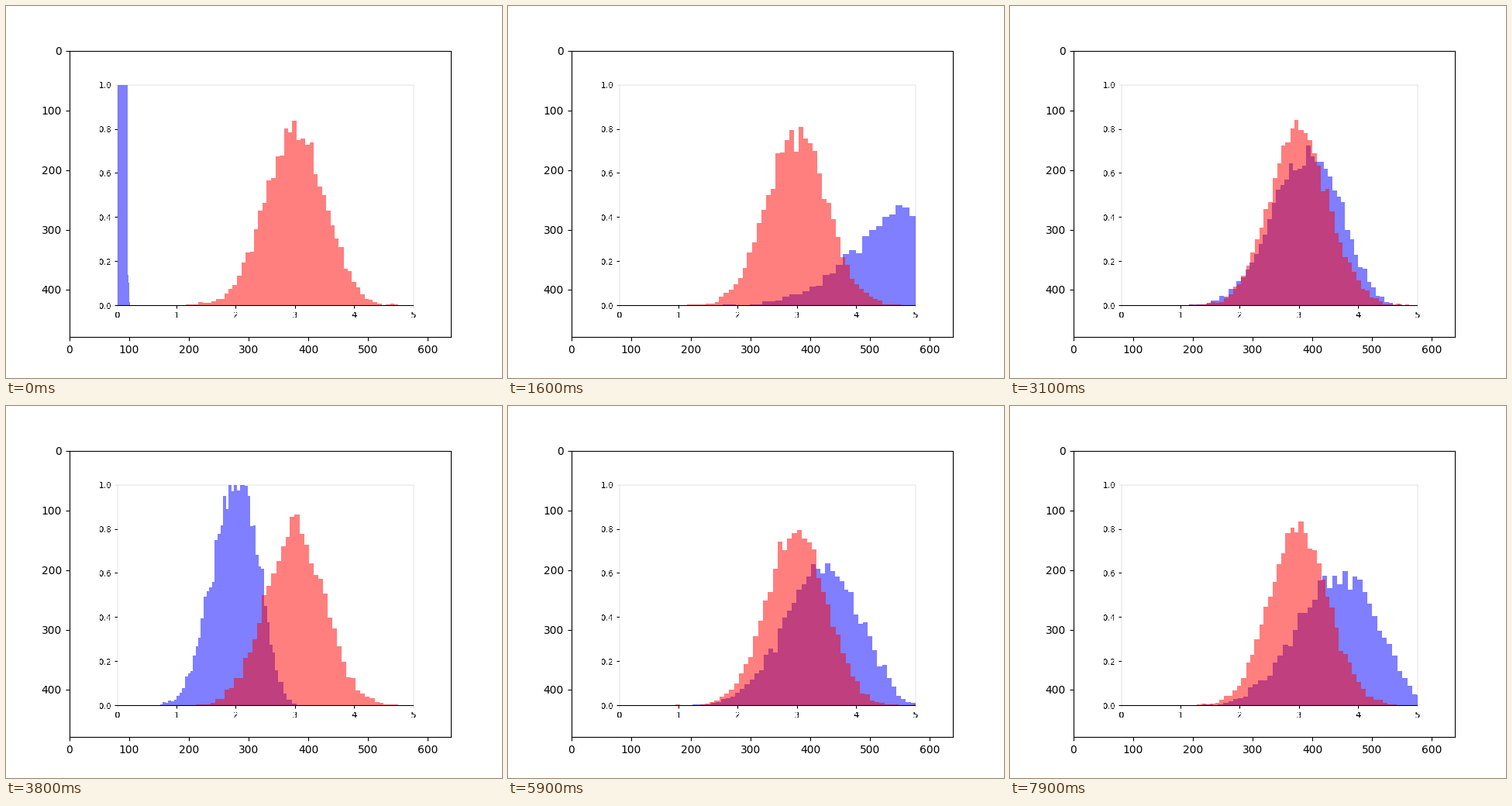
Animation of 640 by 480 pixels, one loop 8 s. Source, as a matplotlib script:

```python
import numpy as np
import matplotlib.pyplot as plt
from matplotlib.animation import FuncAnimation

FRAMES, INTERVAL = 80, 100
SAMPLES, BINS = 10000, 50
W, H = 640, 480
LEFT, RIGHT, TOP, BOTTOM = 80.0, 576.0, 57.6, 427.2
X_MAX = 5
BLUE, RED = np.array([0, 0, 1.0]), np.array([1.0, 0, 0])

# Key times (s) and the position of the blue peak at each
KEY_T = np.array([0, 0.9, 1.6, 3.1, 3.6, 4.6, 5.9, 6.9, 7.9])
KEY_X = np.array([0.09, 1.5, 5.0, 3.17, 2.15, 2.06, 3.48, 2.46, 3.7])

plt.rcParams["text.kerning_factor"] = 6


def peak_at(t):
    """Smooth curve through the key points (cubic Hermite)."""
    k = min(np.searchsorted(KEY_T, t, side="right"), len(KEY_T) - 1)
    x0, x1 = KEY_X[k - 1:k + 1]
    dt = KEY_T[k] - KEY_T[k - 1]

    def slope(j):
        a, b = max(j - 1, 0), min(j + 1, len(KEY_T) - 1)
        return (KEY_X[b] - KEY_X[a]) / (KEY_T[b] - KEY_T[a])

    u = (t - KEY_T[k - 1]) / dt
    ease = u * u * (3 - 2 * u)
    bend = u * (1 - u) * dt * ((1 - u) * slope(k - 1) - u * slope(k))
    return x0 + (x1 - x0) * ease + bend


def blue_samples(rng, peak):
    """Left-leaning bell whose width grows with its position."""
    a, b = 11, 7
    mode = (a - 1) / (a + b - 2)
    return peak + (1.5 * peak + 0.25) * (rng.beta(a, b, SAMPLES) - mode)


def paint_hist(img, data, color):
    """Blend a density histogram at half opacity, edges snapped to pixels."""
    heights, edges = np.histogram(data, BINS, density=True)
    xs = LEFT + (RIGHT - LEFT) * edges / X_MAX
    xs = np.clip(np.round(xs), LEFT, RIGHT).astype(int)
    ys = BOTTOM - (BOTTOM - TOP) * np.minimum(heights, 1)
    ys = np.round(ys).astype(int)
    floor = int(round(BOTTOM))
    for x0, x1, y in zip(xs[:-1], xs[1:], ys):
        bar = img[y:floor, x0:x1]
        bar[:] = (bar + color) / 2


def plain_axes(fig):
    """Render the empty inner plot and return it as an RGB array."""
    ax = fig.add_subplot()
    ax.set(xlim=(0, X_MAX), ylim=(0, 1))
    fig.canvas.draw()
    rgb = np.array(fig.canvas.buffer_rgba())[..., :3] / 255
    fig.clf()
    return rgb


fig = plt.figure(figsize=(W / 100, H / 100), dpi=100)
ink = plain_axes(fig)
ax = fig.add_subplot()
picture = ax.imshow(ink, interpolation="nearest")


def update(i):
    rng = np.random.default_rng(100 + i)
    img = np.ones((H, W, 3))
    paint_hist(img, blue_samples(rng, peak_at(i * INTERVAL / 1000)), BLUE)
    paint_hist(img, rng.normal(3, 0.5, SAMPLES), RED)
    picture.set_data(img * ink)
    return [picture]


anim = FuncAnimation(fig, update, frames=FRAMES, interval=INTERVAL,
                     repeat=True, repeat_delay=0)
plt.show()
```
